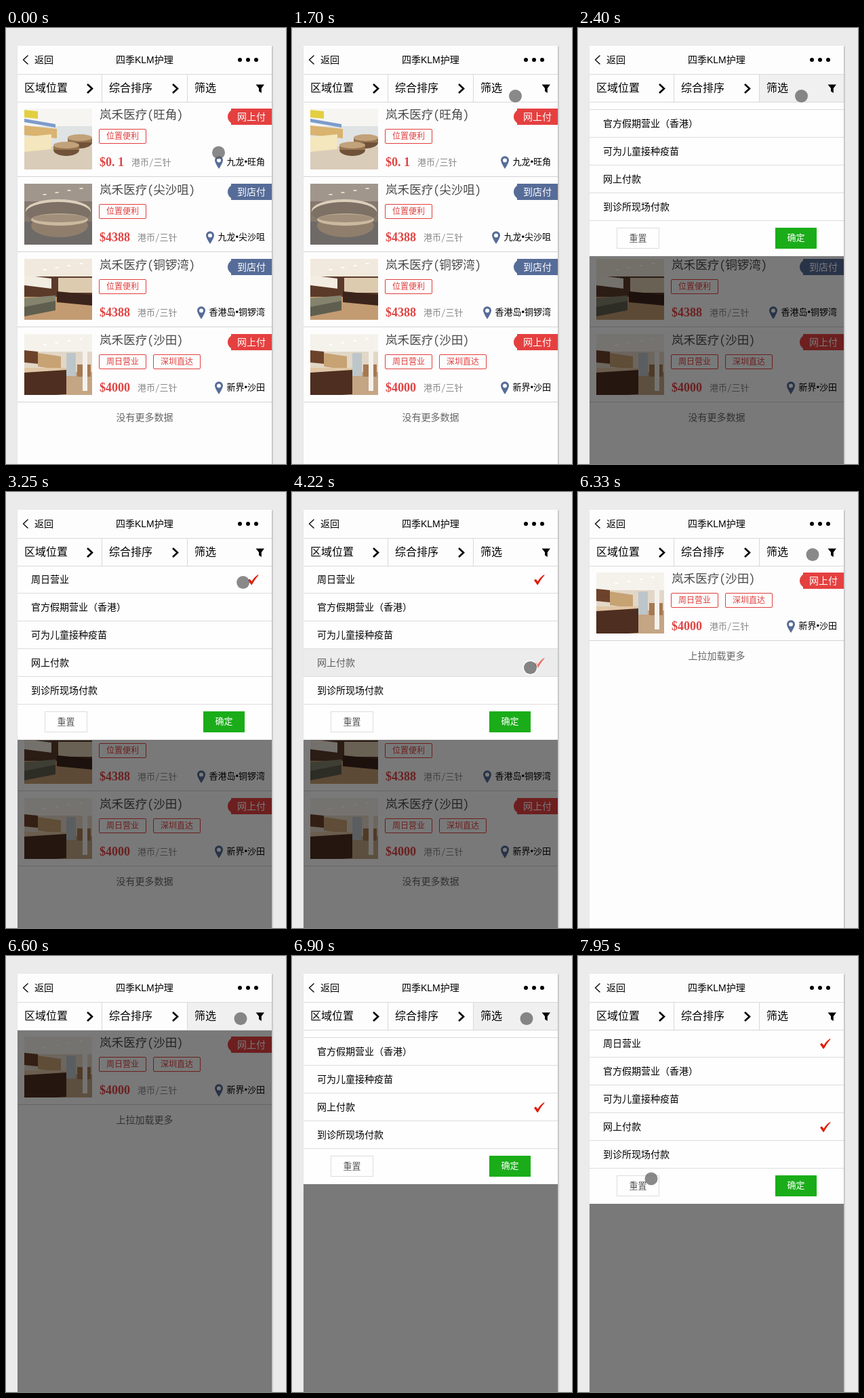
These frames come from a looping animation (413 px wide and 644 px high, 8 s). An HTML page:

```html
<!DOCTYPE html>
<html lang="zh-CN">
<head>
<meta charset="utf-8">
<title>Clinic list filter</title>
<style>
  html, body { margin: 0; width: 100%; height: 100%; overflow: hidden; background: #ebebeb; }
  body { position: relative; color: #000; font-family: "Liberation Sans", "Noto Sans CJK SC", sans-serif; }
  div, span, svg { box-sizing: border-box; }
  .abs, .item *, .row *, .btn { position: absolute; white-space: nowrap; }
  .t { position: absolute; white-space: nowrap; line-height: 20px; }
  #phone { left: 17px; top: 26px; width: 375px; height: 640px; background: #fdfdfd; box-shadow: 1px 1px 2px rgba(0,0,0,.28); }
  #view { left: 17px; top: 110px; width: 375px; height: 534px; overflow: hidden; }
  #loading { inset: 0; background: #efefef; }
  #shade { inset: 0; background: rgba(0,0,0,.52); }
  #panel { left: 0; top: -1px; width: 375px; height: 257px; background: #fefefe; }
  .line { position: absolute; background: #d9d9d9; }
  .mono { font-family: "Noto Sans Mono CJK SC", "Noto Sans CJK SC", monospace; }

  .item { position: absolute; left: 0; width: 375px; height: 111px; border-bottom: 1px solid #d4d4d4; }
  .item .photo { left: 10px; top: 10px; overflow: hidden; }
  .item .name { left: 121px; top: 8px; font-size: 17.6px; line-height: 20px; color: #4a4a4a; font-weight: 300; }
  .item .tag { top: 40px; width: 70px; height: 22px; border: 1px solid #e23f3f; border-radius: 2px; color: #e23f3f; font-size: 12px; line-height: 21px; text-align: center; }
  .item .cost { left: 121px; top: 79px; line-height: 20px; color: #888; font-size: 13px; }
  .item .cost * { position: static; }
  .item .cost .mono { position: relative; top: -1px; }
  .item .cost b { font: bold 18px/20px "Liberation Serif", serif; color: #e04444; margin-right: 11px; }
  .item .place { right: 10px; top: 79px; padding-left: 16px; line-height: 20px; font-size: 13px; }
  .item .place svg { left: -2px; top: 1px; }
  .item .badge { left: 310px; top: 10px; }
  .item .pay { left: 324px; top: 12px; color: #fff; font-size: 14px; line-height: 20px; }
  .foot { position: absolute; width: 375px; text-align: center; font-size: 14px; line-height: 20px; color: #666; }

  .row { position: absolute; left: 0; width: 375px; height: 41px; border-bottom: 1px solid #dcdcdc; }
  .row span { left: 20px; top: 10px; font-size: 14px; line-height: 20px; }
  .row svg { left: 340px; top: 12px; }
  .row.held span, .row.held svg { opacity: .6; }
  .btn { top: 215px; height: 31px; font-size: 13px; line-height: 30px; text-align: center; }
  #reset { left: 40px; width: 63px; border: 1px solid #ddd; line-height: 29px; color: #555; }
  #apply { left: 274px; width: 61px; background: #1aad19; color: #fff; }

  #cursor { left: -9.5px; top: -9.5px; width: 19px; height: 19px; border-radius: 50%; background: rgba(96,96,96,.74); }
  #cursor.down { box-shadow: 0 0 0 1.5px rgba(255,255,255,.75); }
</style>
</head>
<body>
<div id="phone" class="abs"></div>
<div id="view" class="abs">
  <div id="results"></div>
  <div id="loading" class="abs">
    <svg class="abs" style="left:139px;top:11px" width="21" height="21" fill="none" stroke="#858585" stroke-width="2.4">
      <path d="M4.5 16.5A8.6 8.6 0 0 1 3.5 5.5" stroke="#bdbdbd"/>
      <path d="M2.6 7A8.6 8.6 0 1 1 15 17.8"/>
    </svg>
    <span class="t mono" style="left:165px;top:9px;font-size:14px;color:#666">正在加载...</span>
  </div>
  <div id="shade" class="abs"></div>
  <div id="panel" class="abs">
    <div id="rows"></div>
    <div id="reset" class="btn">重置</div>
    <div id="apply" class="btn">确定</div>
  </div>
</div>
<div id="bar"></div>
<div id="cursor" class="abs"></div>

<script>
const $ = id => document.getElementById(id);
const RED = '#e54040', BLUE = '#566c98';

// Simple interiors on a 100 x 90 board.
const box = (fill, x, y, w, h) => `<rect fill="${fill}" x="${x}" y="${y}" width="${w}" height="${h}"/>`;
const oval = (fill, x, y, rx, ry) => `<ellipse fill="${fill}" cx="${x}" cy="${y}" rx="${rx}" ry="${ry}"/>`;
const slant = (fill, x, y, w, h, drop) => `<path fill="${fill}" d="M${x} ${y}l${w} ${drop}v${h}l${-w} ${-drop}z"/>`;
const room = (ceiling, wall, floor) => box(ceiling, 0, 0, 100, 32) + box(wall, 0, 26, 100, 34) + box(floor, 0, 56, 100, 34);
const lamps = fill => [0, 1, 2, 3].map(i => oval(fill, 30 + i * 18, 16 - i * 3, 3, 1)).join('');
const bench = (x, y, w) => oval('#6f5238', x, y + 7, w, 9) + box('#94744f', x - w, y, w * 2, 7) + oval('#c2a27a', x, y, w, 5);

const photos = [
  room('#f6f5f1', '#dfe3e4', '#d9ccb9') + slant('#e3cf3f', 0, 2, 20, 11, 2) + slant('#7c9ccb', 0, 15, 46, 5, 8) +
    slant('#d9b36f', 0, 25, 48, 14, 5) + slant('#f4e6bd', 0, 42, 40, 22, -4) + bench(82, 43, 18) + bench(62, 54, 19),
  room('#a0968c', '#85786c', '#6e6a68') + oval('#dccfbb', 50, 40, 48, 17) + oval('#7d7065', 50, 43, 48, 16) +
    lamps('#ece2d0') + oval('#8f7e6b', 52, 62, 42, 17) + oval('#cbb99f', 52, 53, 42, 9) + oval('#a08f7b', 52, 51, 40, 6),
  room('#f1e9dd', '#5b3a29', '#c39b72') + lamps('#fff') + slant('#f3ece0', 0, 24, 40, 15, 5) + box('#ddcbb0', 50, 28, 50, 22) +
    slant('#3b241b', 48, 48, 52, 16, 5) + slant('#85836d', 0, 58, 46, 14, -4) + slant('#5f5f4f', 0, 71, 46, 14, -9),
  room('#f5f2ec', '#e2d7c7', '#c4a584') + lamps('#fff') + slant('#6d422b', 0, 24, 20, 18, 2) + slant('#c7a273', 20, 28, 34, 20, 5) +
    box('#bcc6ca', 62, 28, 14, 34) + box('#a57951', 78, 45, 20, 18) + box('#f4f1ed', 86, 6, 7, 78) +
    slant('#e0c6a5', 0, 50, 62, 8, 0) + slant('#4d2e20', 0, 57, 62, 36, -4)
];
const photo = n => `<svg class="photo" width="100" height="90">${photos[n]}</svg>`;

const clinics = [
  { area: '旺角', region: '九龙', price: '$0. 1', tags: ['位置便利'], online: true },
  { area: '尖沙咀', region: '九龙', price: '$4388', tags: ['位置便利'] },
  { area: '铜锣湾', region: '香港岛', price: '$4388', tags: ['位置便利'] },
  { area: '沙田', region: '新界', price: '$4000', tags: ['周日营业', '深圳直达'], online: true }
];

const card = (n, slot) => {
  const c = clinics[n];
  return `<div class="item" style="top:${slot * 111 - 1}px">${photo(n)}
    <span class="name mono">岚禾医疗(${c.area})</span>
    ${c.tags.map((tag, i) => `<span class="tag" style="left:${120 + i * 80}px">${tag}</span>`).join('')}
    <span class="cost"><b>${c.price}</b><span class="mono">港币/三针</span></span>
    <span class="place"><svg width="14" height="19"><path fill="${BLUE}" d="M1 6.300a6 6 0 0 1 12 0Q13 10 7 19Q1 10 1 6.300"/>
      <circle cx="7" cy="6.400" r="3" fill="#fdfdfd"/></svg>${c.region}•${c.area}</span>
    <svg class="badge" width="65" height="24" fill="${c.online ? RED : BLUE}"><circle cx="11" cy="12" r="11"/><rect x="5" width="60" height="24"/></svg>
    <span class="pay">${c.online ? '网上付' : '到店付'}</span></div>`;
};

const list = (ids, note) => ids.map(card).join('') +
  `<div class="foot" style="top:${ids.length * 111 + 11}px">${note}</div>`;
const allResults = list([0, 1, 2, 3], '没有更多数据');
const filtered = list([3], '上拉加载更多');

const options = ['周日营业', '官方假期营业（香港）', '可为儿童接种疫苗', '网上付款', '到诊所现场付款'];
$('rows').innerHTML = options.map((label, i) => `<div class="row" style="top:${i * 41}px"><span>${label}</span>
  <svg width="16" height="17"><path fill="#e01e0c" d="M0 9.500L2.500 7.500L5.500 11Q9 4.500 15 1Q15.800 1 15.300 2Q10 8 6 15.500Q5 16.500 4.300 15.500Z"/></svg></div>`).join('');
const rows = [...document.querySelectorAll('.row')];

const text = (x, y, size, str) => `<span class="t" style="left:${x}px;top:${y - 10}px;font-size:${size}px">${str}</span>`;
const line = (x, y, w, h) => `<div class="line" style="left:${x}px;top:${y}px;width:${w}px;height:${h}px"></div>`;
const chevron = x => `<path d="M${x} 83l7 6.500l-7 6.500" stroke-width="2.600"/>`;
$('bar').innerHTML = `<div id="tab" class="abs" style="left:268px;top:69px;width:124px;height:40px;background:#f0f0f0"></div>` +
  line(17, 68, 375, 1) + line(17, 109, 375, 1) + line(141, 69, 1, 40) + line(267, 69, 1, 40) +
  text(42, 47, 14, '返回') + text(162, 47, 14, '四季KLM护理') +
  text(27, 89, 16, '区域位置') + text(152, 89, 16, '综合排序') + text(278, 89, 16, '筛选') +
  `<svg class="abs" style="left:0;top:0" width="413" height="110"><g fill="none" stroke="#000">
    <path d="M32.500 40.500l-7 6.500l7 6.500" stroke-width="1.300"/>${chevron(120)}${chevron(246)}</g>
    ${[0, 1, 2].map(i => `<circle cx="${345 + i * 12}" cy="47" r="3"/>`).join('')}
    <path d="M368.500 83.500h12.500l-4.200 5.500v7l-3.800-2.500v-4.500z"/></svg>`;

const STEP = 133;
const progress = (t, begin, count) =>
  Math.min(1, Math.max(0, Math.floor((t - begin) / STEP) + 1) / count);
const easeInOut = p => (1 - Math.cos(Math.PI * p)) / 2;
const easeOut = p => 1 - (1 - p) ** 2;
const within = (t, from, to) => t >= from && t < to;
const show = (el, on) => { el.style.display = on ? '' : 'none'; };

const home = { x: 313, y: 183.5 };
const moves = [
  { begin: 440, count: 1, x: 312, y: 182 },
  { begin: 720, count: 2, x: 314, y: 178 },
  { begin: 1300, count: 4, x: 329, y: 100 },
  { begin: 2550, count: 3, x: 349, y: 124 },
  { begin: 3250, count: 6, x: 351, y: 259 },
  { begin: 4640, count: 4, x: 332.5, y: 339.5 },
  { begin: 5910, count: 4, x: 345.5, y: 92 },
  { begin: 7010, count: 5, x: 181, y: 239 },
  { begin: 7680, count: 3, x: 107.5, y: 328.5 }
];
const pointer = t => moves.reduce((p, m) => {
  const k = easeInOut(progress(t, m.begin, m.count));
  return { x: p.x + (m.x - p.x) * k, y: p.y + (m.y - p.y) * k };
}, home);

const OPEN = 2130, CLOSE = 5340, LOADED = 5470, REOPEN = 6600;
const PICK_FIRST = 2830, PICK_SECOND = 4220;

let shown;
function render(t) {
  const content = t < CLOSE ? allResults : filtered;
  if (content !== shown) $('results').innerHTML = shown = content;

  const opened = t < CLOSE ? OPEN : REOPEN;
  const slide = easeOut(progress(t, opened + STEP, 3));
  show($('loading'), within(t, CLOSE, LOADED));
  show($('shade'), t >= opened);
  show($('tab'), t >= opened && slide < 1);
  $('panel').style.transform = `translateY(${Math.round((slide - 1) * 257)}px)`;

  const pressFirst = within(t, PICK_FIRST, 2970);
  const pressSecond = within(t, PICK_SECOND, 4500);
  rows.forEach((row, i) => {
    const gray = i === 0 && pressFirst || i === 3 && pressSecond;
    show(row.querySelector('svg'), i === 0 && t >= PICK_FIRST || i === 3 && t >= PICK_SECOND);
    row.style.background = gray ? '#ececec' : '';
    row.classList.toggle('held', gray || i === 0 && within(t, 2970, 3250));
  });

  const { x, y } = pointer(t);
  $('cursor').style.transform = `translate(${x}px, ${y}px)`;
  $('cursor').classList.toggle('down', pressFirst || pressSecond);
}

const start = performance.now();
function tick() {
  render((performance.now() - start) % 8000);
  requestAnimationFrame(tick);
}
tick();
</script>
</body>
</html>
```
